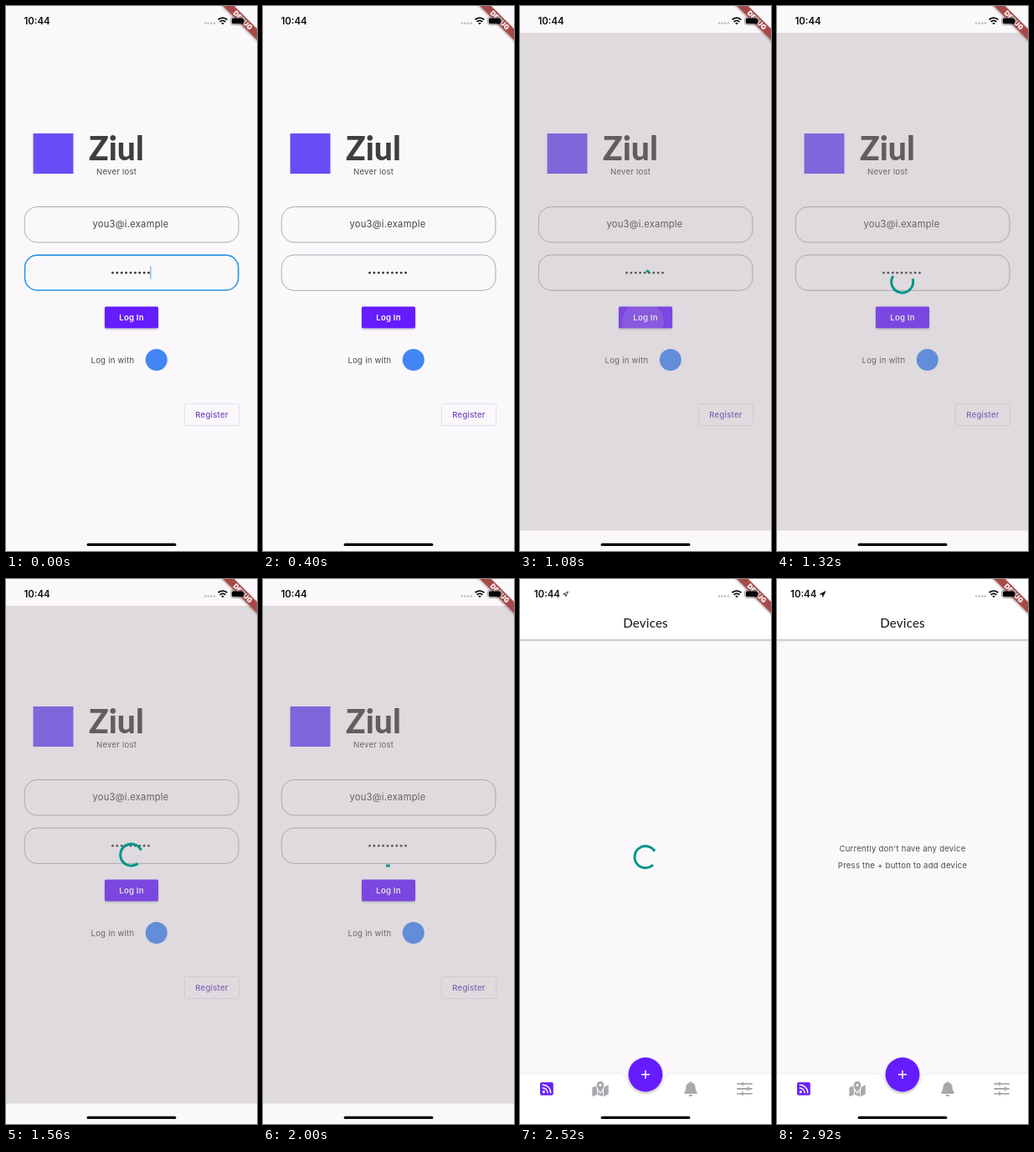
These frames come from a looping animation (300 px wide and 650 px high, 2960 ms). An HTML page:

```html
<!DOCTYPE html>
<html lang="en">
<head>
<meta charset="utf-8">
<title>App sign-in</title>
<style>
  html, body { margin: 0; width: 100%; height: 100%; overflow: hidden; background: #faf8fb; }
  svg { display: block; width: 100vw; height: 100vh; font-family: Inter, Roboto, sans-serif; }
  .mid { text-anchor: middle; }
  .small { font-size: 9.6px; letter-spacing: .22px; fill: #4c4b4e; }
  .brand { font-family: Lato, "Open Sans", sans-serif; }
  .field { fill: none; stroke: #a5a3a7; stroke-width: .9; }
  .line { fill: none; stroke-linecap: round; }
</style>
</head>
<body>
<svg viewBox="0 0 300 650">
  <defs>
    <clipPath id="buttonClip"><rect x="118" y="358.5" width="64" height="25.7" rx="1.6"/></clipPath>
    <filter id="shade" x="-20%" y="-20%" width="140%" height="160%">
      <feDropShadow dx="0" dy="1.2" stdDeviation="1.3" flood-opacity=".3"/>
    </filter>
    <filter id="soft" x="-10%" y="-20%" width="120%" height="140%">
      <feDropShadow dx="0" dy="-.3" stdDeviation="1" flood-opacity=".13"/>
    </filter>
  </defs>
  <rect width="300" height="650" fill="#faf8fb"/>

  <g id="login">
    <rect x="32.5" y="152" width="48" height="48" fill="#6a4df6"/>
    <text class="brand" x="99" y="184" font-size="39" font-weight="800" fill="#3f3f40">Ziul</text>
    <text class="small" x="108" y="201">Never lost</text>

    <rect class="field" x="22.2" y="239.5" width="255.8" height="42.4" rx="15"/>
    <text class="mid" x="149" y="264" font-size="11.2" letter-spacing=".25" fill="#464548">you3@i.example</text>
    <rect class="field" x="22.2" y="296.9" width="255.8" height="42.4" rx="15"/>
    <rect id="focus" class="field" x="22.6" y="297.3" width="255" height="41.6" rx="14.6"
      style="stroke:#2196f3;stroke-width:1.4"/>
    <g id="dots" fill="#39383b"></g>
    <rect id="caret" x="172.2" y="310" width="1.4" height="15.5" rx=".6" fill="#2d90e8"/>

    <rect x="118" y="358.5" width="64" height="25.7" rx="1.6" fill="#651fff" filter="url(#shade)"/>
    <g clip-path="url(#buttonClip)"><circle id="ripple" cx="147" cy="378" fill="#fff"/></g>
    <text class="small mid" x="150" y="374.7" style="fill:#fff;font-weight:600">Log In</text>

    <text class="small" x="101.5" y="425.5">Log in with</text>
    <circle cx="179.8" cy="422" r="13" fill="#4285f4"/>

    <rect x="213.4" y="474.4" width="65.2" height="26" rx="2" fill="none" stroke="#dfdde2" stroke-width=".9"/>
    <text class="small mid" x="246" y="491" style="fill:#7046be;font-weight:500">Register</text>
  </g>
  <rect id="dim" y="32" width="300" height="593.5" fill="#a49da2" opacity=".335"/>

  <rect id="speck" x="11.2" y="0" width="3.6" height="1.5" fill="#009688"/>

  <g id="home">
    <rect x="-10" y="-10" width="320" height="82" fill="#fff" filter="url(#shade)"/>
    <text class="brand mid" x="150" y="57.8" font-size="15.2" font-weight="500" letter-spacing=".15" fill="#242326">Devices</text>
    <g id="empty" class="small mid">
      <text x="150" y="325">Currently don't have any device</text>
      <text x="150" y="344.6">Press the + button to add device</text>
    </g>
    <path filter="url(#soft)" fill="#fff" d="M-9 590.4H114C121 590.4 125.3 592 126.8 597
      A24 24 0 0 0 173.2 597C174.7 592 179 590.4 186 590.4H309V660H-9Z"/>
    <circle cx="150" cy="591" r="20.4" fill="#651fff" filter="url(#shade)"/>
    <path d="M145 591H155M150 586V596" stroke="#fff" stroke-width="1.5"/>

    <rect x="24" y="600.2" width="15.8" height="15.6" rx="2" fill="#651fff"/>
    <circle cx="28.3" cy="611.7" r="1.6" fill="#fff"/>
    <path class="line" stroke="#fff" stroke-width="1.5" d="M27.2 607A6 6 0 0 1 33 612.8M27.2 603.3A9.5 9.5 0 0 1 36.7 612.8"/>

    <g fill="#aaa8ac">
      <path d="M86.3 606.5L90.8 604.6Q91.2 607.2 92.1 608.8V615L86.3 617.2Z
        M93 610.4L96 614L99 610.4V617.2L93 615Z M100 608.8L101.2 605.4L105.7 603.6V614.6L100 617.2Z"/>
      <path fill-rule="evenodd" d="M96 612.2C93 608.6 91.6 606 91.6 603.5A4.4 4.4 0 0 1 100.4 603.5
        C100.4 606 99 608.6 96 612.2ZM96 601.9A1.6 1.6 0 1 0 96 605.1A1.6 1.6 0 1 0 96 601.9Z"/>
      <path d="M204 599.2Q205 599.2 205.1 600.4C208.3 601 209.6 603.5 209.6 606.3
        C209.6 609.7 210.6 610.8 211.6 612Q212.2 613.8 210.8 614H197.2Q195.8 613.8 196.4 612
        C197.4 610.8 198.4 609.7 198.4 606.3C198.4 603.5 199.7 601 202.9 600.4Q203 599.2 204 599.2Z
        M201.7 615H206.3A2.3 2.3 0 0 1 201.7 615Z"/>
    </g>
    <path class="line" stroke="#aaa8ac" stroke-width="1.8" d="M260 602.2H277M260 608H277M260 613.8H277"/>
    <path class="line" stroke="#aaa8ac" stroke-width="2.6" d="M266 601.3V603.1M273 607.1V608.9M266 612.9V614.7"/>
  </g>

  <path id="spinner" fill="none" stroke="#009688" stroke-width="3" stroke-linecap="square"/>

  <g transform="translate(300 0) rotate(45)">
    <rect x="-34" y="19.2" width="68" height="9.6" fill="#a84848" filter="url(#shade)"/>
    <text class="mid" x="0" y="26.9" font-size="8.16" font-weight="900" fill="#fff">DEBUG</text>
  </g>

  <g id="clock">
    <text y="22" font-size="11.4" font-weight="600" fill="#0b0b0c">10:44</text>
  </g>
  <path id="arrow" d="M-3.4 .2L3.4 -3.4L.2 3.4L-.4 .5Z" stroke="#0b0b0c" stroke-linejoin="round"/>
  <g fill="#c2c0c5">
    <circle cx="238" cy="20.6" r="1.3"/><circle cx="241.6" cy="20.6" r="1.3"/>
    <circle cx="245.2" cy="20.6" r="1.3"/><circle cx="248.8" cy="20.6" r="1.3"/>
  </g>
  <path fill="none" stroke="#0b0b0c" stroke-width="1.7"
    d="M253.6 16.4A7.6 7.6 0 0 1 264.4 16.4M255.6 18.8A4.8 4.8 0 0 1 262.4 18.8"/>
  <path fill="#0b0b0c" d="M257.2 20.4Q259 18.9 260.8 20.4L259 22.2Z"/>
  <rect x="268.6" y="13.4" width="17" height="9" rx="2.6" fill="none" stroke="#8d8589" stroke-width=".8"/>
  <rect x="269.8" y="14.6" width="14.6" height="6.6" rx="1.6" fill="#050505"/>
  <path d="M286.6 16.4Q288 17.9 286.6 19.4Z" fill="#8d8589"/>
  <rect x="96.6" y="640.8" width="106.8" height="3.2" rx="1.6" fill="#000"/>
</svg>
<script>
const LOOP = 2960, STEP = 40;
const SUBMIT = 1080, BLANK = 2040, HOME = 2120, LOADED = 2720;
const SPEED = 1.25;

const el = id => document.getElementById(id);
const show = (id, on) => el(id).style.display = on ? '' : 'none';
const set = (id, attrs) => { for (const k in attrs) el(id).setAttribute(k, attrs[k]); };
const clamp = x => Math.min(1, Math.max(0, x));
const ramp = (t, a, b) => clamp((t - a) / (b - a));

for (let i = 0; i < 9; i++) {
  const dot = document.createElementNS('http://www.w3.org/2000/svg', 'circle');
  dot.setAttribute('cx', 127.5 + i * 5.38);
  dot.setAttribute('cy', 318.2);
  dot.setAttribute('r', 1.35);
  el('dots').append(dot);
}

// cubic-bezier(.4, 0, .2, 1)
function ease(x) {
  let lo = 0, hi = 1, s = .5;
  for (let i = 0; i < 24; i++) {
    s = (lo + hi) / 2;
    const bx = 1.2 * s * (1 - s) ** 2 + .6 * s * s * (1 - s) + s ** 3;
    if (bx < x) lo = s; else hi = s;
  }
  return 3 * s * s * (1 - s) + s ** 3;
}

// Indeterminate ring: head grows, then tail catches up, while all turns
function ringPath(ms, cx, cy, r) {
  const u = ms / 1333 % 1;
  const head = ease(clamp(u * 2)), tail = ease(clamp(u * 2 - 1));
  const start = Math.PI * (-.5 + 1.5 * tail + 2 * ms / 2222 + .5 * u);
  const sweep = Math.max(1.5 * Math.PI * (head - tail), .01);
  const at = a => (cx + r * Math.cos(a)).toFixed(3) + ' ' + (cy + r * Math.sin(a)).toFixed(3);
  return `M${at(start)}A${r} ${r} 0 ${sweep > Math.PI ? 1 : 0} 1 ${at(start + sweep)}`;
}

function draw(t) {
  const waiting = t >= SUBMIT && t < BLANK;
  const home = t >= HOME;
  const fetching = home && t < LOADED;

  show('login', t < BLANK);
  show('dim', waiting);
  show('speck', t >= BLANK && !home);
  show('home', home);
  show('empty', t >= LOADED);
  show('spinner', waiting || fetching);

  set('focus', { opacity: 1 - ramp(t, 160, 400) });
  set('caret', { opacity: .6 * (1 - ramp(t, 0, 200)) });
  set('ripple', {
    r: t <= 1040 ? 0 : 25 + 45 * ramp(t, SUBMIT, 1280),
    opacity: .13 * (1 - ramp(t, 1120, 1320))
  });

  if (waiting) set('spinner', { d: ringPath(48 + (t - SUBMIT) * SPEED, 149.7, 329, 13) });
  if (fetching) set('spinner', { d: ringPath(120 + (t - HOME) * SPEED, 150, 331.6, 13) });

  const slide = ramp(t, 2240, 2360), full = ramp(t, 2520, 2600);
  set('clock', { transform: `translate(${21.5 - 4.7 * slide - .7 * full} 0)` });
  set('arrow', {
    transform: `translate(54.6 18) scale(${.85 + .2 * full})`,
    opacity: slide,
    fill: full > .4 ? '#0b0b0c' : 'none',
    'stroke-width': .9 - .4 * full
  });
}

const origin = performance.now();
function tick() {
  const t = (performance.now() - origin) % LOOP;
  draw(Math.floor(t / STEP) * STEP);
  requestAnimationFrame(tick);
}
tick();
</script>
</body>
</html>
```
